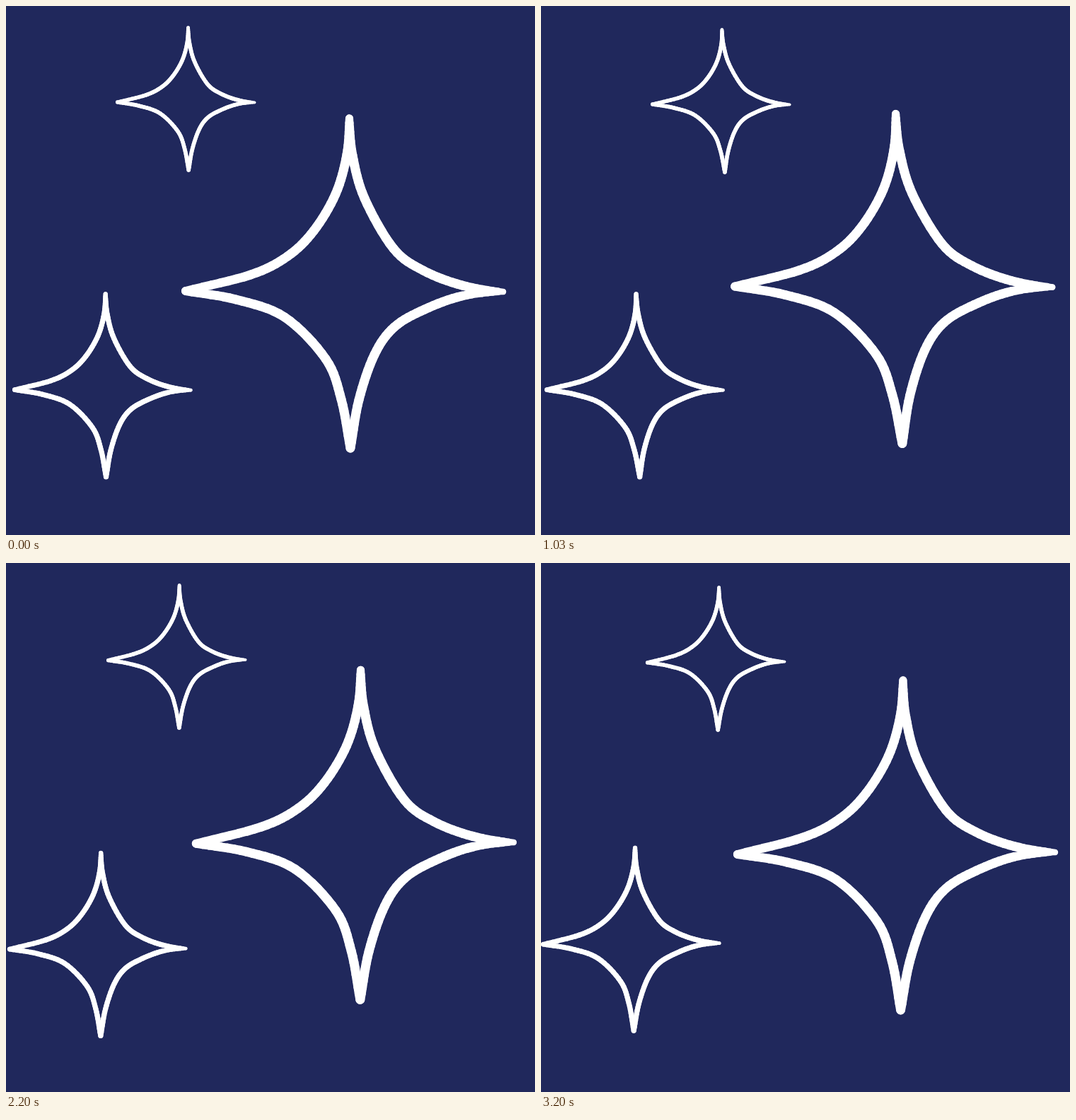
An HTML page with a canvas for the animation above (3230 ms loop, 748 px wide and 748 px high).

```html
<!DOCTYPE html>
<html lang="en">
<head>
<meta charset="utf-8">
<title>Wobbling stars</title>
<style>
html, body { margin: 0; width: 100%; height: 100%; overflow: hidden; background: #20285c; }
canvas { display: block; width: 100vmin; height: 100vmin; }
</style>
</head>
<body>
<canvas id="stage" width="748" height="748"></canvas>
<script>
const ctx = document.getElementById('stage').getContext('2d');
const LOOP = 3230, STEPS = 81, LINE = 13;

// Star outline: four tips and a few points of the arcs between them.
const T = [485.5, 159], L = [254, 403], B = [487, 625], R = [703, 404];
const ARCS = [
  [T, [482, 210], [466, 266], [435, 318], [398, 354], [346, 380], L],
  [L, [325, 415], [394, 440], [452, 499], [474, 556], B],
  [B, [499, 557], [521, 493], [549, 454], [592, 429], [645, 410], R],
  [R, [645, 395], [590, 374], [548, 343], [507, 272], [490, 211], T]
];
const tipWidth = new Map([[T, 11], [L, 12], [B, 13], [R, 8]]);

// Steps at which the wobble turns; all stars share the lean [sideways, upright].
const TURNS = [0, 14, 26, 34, 47, 64, 80];
const LEAN = [[0, 0], [3, -5], [8, 0], [-6, 0], [2, -5], [-8, 0], [-5, -4]];

// drift: offset at each turn; sway: extra swing between turns.
const STARS = [
  { x: 248, y: 153, scale: 1, sway: [7, 0],
    drift: [[0, 0], [32.5, 11], [20, -6.5], [13, 9], [10.5, -11], [7.5, 0], [24, 7]] },
  { x: 155, y: 28, scale: 0.432, sway: [0, -3],
    drift: [[0, 0], [-16, 9], [0, 3], [-9, 4], [-11, 4], [-14, 4], [-7, 4]] },
  { x: 9, y: 404, scale: 0.5545, sway: [-1.5, 3],
    drift: [[0, 0], [-7, -1.5], [-4, 0], [6.5, -1.5], [-2.5, -1.5], [-8, 0.5], [-9, -4.5]] }
];

// Point on a smooth curve through pts; s counts points from the start.
function spline(pts, s) {
  const n = pts.length - 1, i = Math.min(n - 1, Math.floor(s));
  const u = s - i, v = 1 - u;
  const slope = (j, c) => {
    const a = Math.max(0, j - 1), b = Math.min(n, j + 1);
    return (pts[b][c] - pts[a][c]) / (b - a);
  };
  return [0, 1].map(c =>
    v * v * (1 + 2 * u) * pts[i][c] + u * u * (3 - 2 * u) * pts[i + 1][c]
    + u * v * (v * slope(i, c) - u * slope(i + 1, c)));
}

function turnAt(step) {
  let i = 0;
  while (i < TURNS.length - 2 && step >= TURNS[i + 1]) i++;
  return i + (step - TURNS[i]) / (TURNS[i + 1] - TURNS[i]);
}

function strokeArc(arc, warp, scale) {
  const pts = arc.map(warp), n = pts.length - 1, sub = 8;
  const taper = (tip, dist) => (tipWidth.get(tip) - LINE) * Math.max(0, 1 - dist);
  let from = pts[0];
  for (let q = 1; q <= n * sub; q++) {
    const s = q / sub, to = spline(pts, s);
    ctx.lineWidth = scale * (LINE + taper(arc[0], s) + taper(arc[n], n - s));
    ctx.beginPath();
    ctx.moveTo(...from);
    ctx.lineTo(...to);
    ctx.stroke();
    from = to;
  }
}

function drawStar({ x, y, scale, sway, drift }, turn) {
  const [dx, dy] = spline(drift, turn);
  const [side, tilt] = spline(LEAN, turn);
  const swing = Math.sin(Math.PI * turn) ** 2;
  const warp = ([px, py]) => [
    x + dx + swing * sway[0] + scale * (px - 248 + side * (py - 393) / 480),
    y + dy + swing * sway[1] + scale * (py - 153 + tilt * (px - 478) / 460)
  ];
  ARCS.forEach(arc => strokeArc(arc, warp, scale));
}

function draw() {
  const t = performance.now() % LOOP;
  const step = Math.min(STEPS - 1, Math.floor((t + 8) * STEPS / LOOP));
  ctx.fillStyle = '#20285c';
  ctx.fillRect(0, 0, 748, 748);
  ctx.strokeStyle = '#fff';
  ctx.lineCap = 'round';
  STARS.forEach(star => drawStar(star, turnAt(step)));
  requestAnimationFrame(draw);
}
draw();
</script>
</body>
</html>
```
